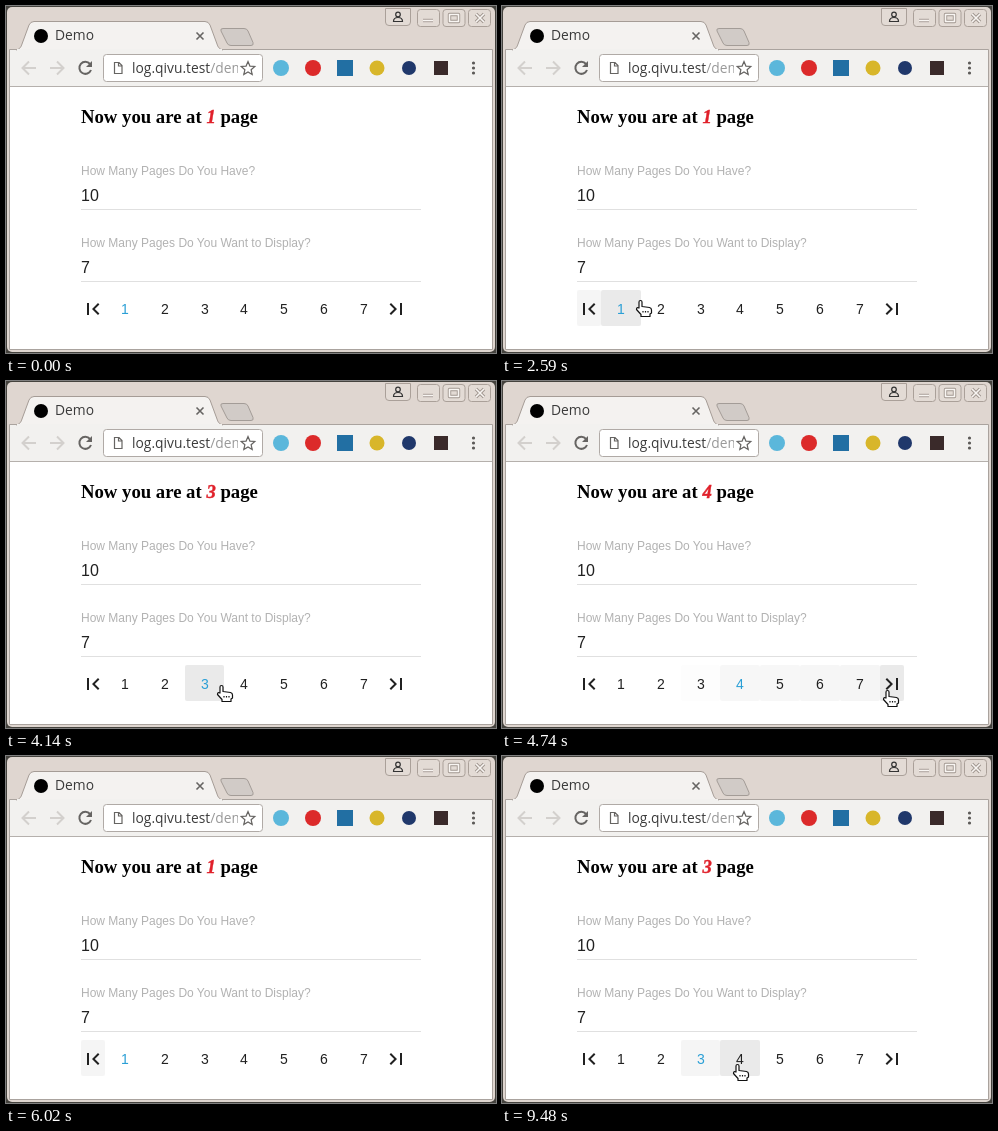
Animation of 490x347 px, one loop 9.58 s. Source, as an HTML page:

```html
<!DOCTYPE html>
<html lang="en">
<head>
<meta charset="utf-8">
<title>Demo</title>
<style>
  html, body { margin: 0; width: 100%; height: 100%; overflow: hidden; background: #45433e; }
  svg { display: block; width: 490px; height: 347px; }
  .ui { font: 13.8px "Open Sans", "Noto Sans", sans-serif; fill: #3a3a3a; }
  .heading { font: bold 18.72px "Liberation Serif", serif; }
  .heading tspan { font-style: italic; fill: #e0202a; stroke: #e0202a; stroke-width: .4; }
  .label { font: 12px "Liberation Sans", sans-serif; fill: #b2b2b2; }
  .value { font: 16px "Liberation Sans", sans-serif; fill: #212121; }
  .page { font: 14px "Liberation Sans", sans-serif; text-anchor: middle; }
  .line { fill: none; stroke: #666462; stroke-width: 1.2; }
  .nav { stroke: #d3d0cd; stroke-width: 2; }
  .button { fill: #e3dbd5; stroke: #aaa099; }
  .glyph { fill: none; stroke: #a0968f; stroke-width: 3.4; stroke-linejoin: round; }
  .glyph.inner { stroke: #f8f5f2; stroke-width: 1.6; }
  .pointer { fill: #fff; stroke: #111; stroke-width: 1.2; stroke-linejoin: round; }
</style>
</head>
<body>
<svg viewBox="0 0 490 347">
  <defs>
    <clipPath id="address"><path d="M120 48H232V76H120z"/></clipPath>
    <rect id="box" y="3.500" width="22" height="17" rx="3"/>
    <g id="controls">
      <path d="M417 14.500h10"/>
      <path d="M443.500 8.500h9v7h-9z"/>
      <path d="M470 8l8 8m0-8l-8 8"/>
    </g>
  </defs>

  <!-- window frame -->
  <rect x="1" y="1" width="488" height="345" rx="5" fill="#dfd6d0"/>
  <path d="M4 43.500H486V81H4z" fill="#f2f1ef"/>
  <path d="M4 81H486V343H4z" fill="#fff"/>
  <path d="M3.500 43.500H486.500V343.500H3.500z" fill="none" stroke="#aaa39e"/>
  <path d="M4 80.500H486" stroke="#b5b0ac"/>
  <path d="M10 44C14 43 15 41 16 38L23 19Q24.500 15.500 28 15.500H199Q202.500 15.500 204 19L211 38C212 41 213 43 217 44" fill="#f4f2f0" stroke="#a59c96"/>
  <path d="M11 44H216" stroke="#f2f1ef" stroke-width="2"/>
  <path d="M217 22.500H238Q241 22.500 242 25L247 36.500Q248 39.500 245 39.500H225Q222 39.500 221 37L215 25Q214 22.500 217 22.500z" fill="#d1cbc7" stroke="#a39c97"/>
  <circle cx="35" cy="30" r="7"/>
  <text class="ui" x="49" y="34">Demo</text>
  <path class="line" d="M190.500 26.500l7 7m0-7l-7 7" style="stroke-width:1.600"/>

  <path class="button" d="M379.500 2.500H404.500V16Q404.500 19.500 401 19.500H383Q379.500 19.500 379.500 16z"/>
  <g class="line" style="stroke:#333">
    <circle cx="392" cy="8.500" r="2.300"/>
    <path d="M387.500 15.500Q387.500 11.500 392 11.500T396.500 15.500z"/>
  </g>
  <g class="button">
    <use href="#box" x="411.500"/><use href="#box" x="437"/><use href="#box" x="462.500"/>
  </g>
  <use href="#controls" class="glyph"/>
  <use href="#controls" class="glyph inner"/>

  <!-- toolbar -->
  <path class="line nav" d="M30 62H17M23 55.500L16.500 62L23 68.500M44 62H57M51 55.500L57.500 62L51 68.500"/>
  <path class="line" d="M84 58A6 6 0 1 0 85 64" style="stroke-width:2"/>
  <path d="M86 55V61H80z" fill="#666462"/>
  <rect x="97.500" y="48.500" width="159" height="27" rx="3" fill="#fff" stroke="#b0aaa6"/>
  <path class="line" d="M108.500 56.500H113L116 59.500V67.500H108.500zM112.500 56.500V60H116"/>
  <g clip-path="url(#address)">
    <text class="ui" x="126" y="67">log.qivu.test<tspan fill="#999">/demo</tspan></text>
  </g>
  <path class="line" d="M242 55.500l1.900 4.600 4.900.4-3.700 3.200 1.100 4.800-4.200-2.600-4.200 2.600 1.100-4.800-3.700-3.200 4.900-.4z"/>
  <circle cx="275" cy="62" r="8" fill="#5bb7db"/>
  <circle cx="307" cy="62" r="8" fill="#dc2a2a"/>
  <path d="M331 54h16v16h-16z" fill="#226fa3"/>
  <circle cx="371" cy="62" r="7.500" fill="#d8b62a"/>
  <circle cx="403" cy="62" r="7" fill="#20386b"/>
  <path d="M428 55h14v14h-14z" fill="#3a2a2a"/>
  <path d="M467.500 57v11" stroke="#5c5a58" stroke-width="3.200" stroke-linecap="round" stroke-dasharray="0 5"/>

  <!-- page -->
  <text class="heading" x="75" y="117">Now you are at <tspan id="current">1</tspan> page</text>
  <text class="label" x="75" y="169">How Many Pages Do You Have?</text>
  <text class="value" x="75" y="195">10</text>
  <text class="label" x="75" y="241">How Many Pages Do You Want to Display?</text>
  <text class="value" x="75" y="267">7</text>
  <path d="M75 203.500H415M75 275.500H415" stroke="#e0e0e0"/>
  <g id="pager"></g>

  <g class="pointer">
    <path id="arrow" d="M.500.500V16.500L4.300 13L7 19.300L9.800 18L7.200 12H12z"/>
    <path id="hand" d="M-2 2Q-2 .5-.5 .5T1 2V6.500L8.500 7.500Q10.500 8 10.500 10V13L9 14V16.500H0V14.500L-4.500 9.500Q-4.500 6.800-2 8zM2 11v1.500M4.500 11v1.500M7 11v1.500"/>
    <g id="resize">
      <path d="M480.500 329.500H483.500V345.500H466.500V342.500H480.500z"/>
      <path d="M466.500 331.500L468.500 329.500L475.500 336V331.500H478.500V340.500H468.500V337.500H472.500z"/>
    </g>
  </g>
</svg>

<script>
const LOOP = 9580, LEAVE = 6020, RESIZE = 8110, RETURN = 8320;
const FADE = 400, FADE_STEP = 10;
const PADDING = 32, DIGIT = 7.786, ICON = 24;
const ROW = { left: 75, top: 284, height: 36 };
const LAST = 8;

// Pointer stops: [arrival, travel time, x, y, page clicked on arrival]
const stops = [
  [1870, 0, 202, 213],
  [2310, 440, 61, 281],
  [2710, 400, 160, 297],
  [2900, 0, 160, 297, 2],
  [3420, 240, 209, 303],
  [3620, 0, 209, 303, 3],
  [3820, 200, 216, 304],
  [4560, 120, 240, 315, 4],
  [4620, 40, 386, 309],
  [4780, 0, 386, 309, 10],
  [4900, 80, 380, 275],
  [5340, 440, 84, 285],
  [5580, 0, 84, 285, 1],
  [5980, 80, 451, 250],
  [RETURN, 0, 249, 338],
  [9240, 920, 207, 305, 3],
  [9480, 200, 236, 308]
];

const icons = {
  0: "M18.410 16.590L13.820 12l4.590-4.590L17 6l-6 6 6 6zM6 6h2v12H6z",
  [LAST]: "M5.590 7.410L10.180 12l-4.590 4.590L7 18l6-6-6-6zM16 6h2v12h-2z"
};

const byId = id => document.getElementById(id);
const clamp = v => Math.max(0, Math.min(1, v));
const smooth = k => k * k * (3 - 2 * k);
const show = (el, on) => el.setAttribute("visibility", on ? "visible" : "hidden");
const move = (el, x, y) => el.setAttribute("transform", `translate(${x} ${y})`);

function add(parent, tag, attrs) {
  const el = document.createElementNS("http://www.w3.org/2000/svg", tag);
  for (const key in attrs) el.setAttribute(key, attrs[key]);
  return parent.appendChild(el);
}

const buttons = Array.from({ length: LAST + 1 }, (_, i) => {
  const group = add(byId("pager"), "g", {});
  const back = add(group, "rect", { y: ROW.top, height: ROW.height, rx: 2, fill: "#9e9e9e" });
  const face = icons[i]
    ? add(group, "path", { d: icons[i], transform: "translate(0 291)", fill: "#212121" })
    : add(group, "text", { class: "page", y: 308 });
  return { group, back, face };
});

function pageAt(t) {
  const click = stops.filter(s => s[4] && s[0] <= t).pop();
  return click ? click[4] : 1;
}

function pointerAt(t) {
  if (t < stops[0][0] || (t >= LEAVE && t < RETURN)) return null;
  const next = stops.findIndex(s => s[0] > t);
  const [, , x0, y0] = stops.at(next < 0 ? -1 : next - 1);
  if (next < 0) return { x: x0, y: y0 };
  const [arrival, travel, x1, y1] = stops[next];
  const k = travel ? smooth(clamp(1 - (arrival - t) / travel)) : 0;
  return { x: x0 + (x1 - x0) * k, y: y0 + (y1 - y0) * k };
}

// Labels and pixel-aligned boxes of the nine buttons for the selected page.
function layout(page) {
  const first = Math.max(1, Math.min(page - 3, 4));
  let edge = ROW.left;
  return buttons.map((_, i) => {
    const label = String(first + i - 1);
    const x = Math.round(edge);
    edge += icons[i] ? ICON : PADDING + DIGIT * label.length;
    return { label, x, width: Math.round(edge) - x };
  });
}

function buttonUnder(at, cells) {
  if (!at || at.y < ROW.top || at.y > ROW.top + ROW.height) return -1;
  return cells.findIndex(c => at.x >= c.x && at.x < c.x + c.width);
}

// Each button keeps a fading trace of the pointer's recent visits.
function hoverLevels(t, cells) {
  const levels = buttons.map(() => 0);
  for (let age = FADE; age >= 0; age -= FADE_STEP) {
    const i = buttonUnder(pointerAt(t - age), cells);
    if (i >= 0) levels[i] = (1 - age / FADE) ** 2;
  }
  return levels;
}

function draw(t) {
  const page = pageAt(t);
  const cells = layout(page);
  const levels = hoverLevels(t, cells);
  byId("current").textContent = page;

  buttons.forEach(({ group, back, face }, i) => {
    const { label, x, width } = cells[i];
    move(group, x, 0);
    back.setAttribute("width", width);
    back.setAttribute("fill-opacity", 0.22 * levels[i]);
    if (icons[i]) return;
    face.textContent = label;
    face.setAttribute("x", (PADDING + DIGIT * label.length) / 2);
    face.setAttribute("fill", label === String(page) ? "#2a9fd6" : "#212121");
  });

  const at = pointerAt(t);
  const onButton = buttonUnder(at, cells) >= 0;
  show(byId("hand"), onButton);
  show(byId("arrow"), at && !onButton);
  show(byId("resize"), t >= RESIZE && t < RESIZE + 40);
  if (at) move(byId(onButton ? "hand" : "arrow"), Math.round(at.x), Math.round(at.y));
}

const began = performance.now();
function frame() {
  const t = (performance.now() - began) % LOOP;
  // The picture stands still while the pointer is outside the window.
  draw(t > LEAVE && t < RESIZE ? LEAVE : t);
  requestAnimationFrame(frame);
}
frame();
</script>
</body>
</html>
```
